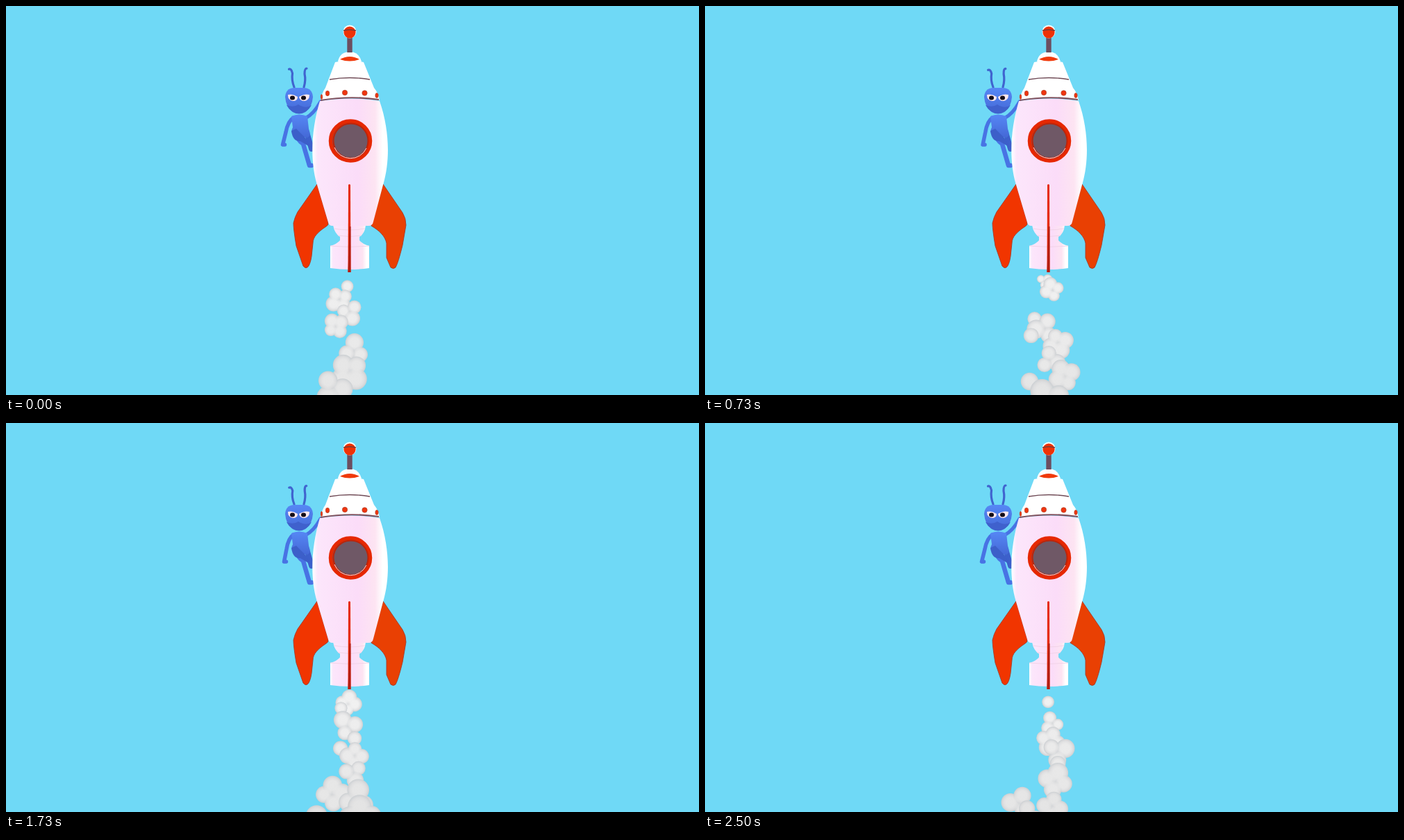
These frames come from a looping animation (998x561 px, 2.53 s). An HTML page with a canvas:

```html
<!DOCTYPE html>
<html lang="en">
<head>
<meta charset="utf-8">
<title>Rocket ride</title>
<style>
  html, body { margin: 0; width: 100%; height: 100%; overflow: hidden; background: #6fd9f6; }
  canvas, svg { position: absolute; left: 0; top: 0; width: 998px; height: 561px; }
</style>
</head>
<body>
<canvas id="smoke" width="998" height="561"></canvas>
<svg viewBox="0 0 998 561">
  <defs>
    <linearGradient id="hull">
      <stop offset="0" stop-color="#fff"/>
      <stop offset=".07" stop-color="#fce6fb"/>
      <stop offset=".6" stop-color="#fbdcf8"/>
      <stop offset=".83" stop-color="#fde4f2"/>
      <stop offset=".93" stop-color="#fff"/>
    </linearGradient>
    <linearGradient id="skin" x2="0" y2="1">
      <stop offset="0" stop-color="#5688f5"/>
      <stop offset="1" stop-color="#4468d6"/>
    </linearGradient>
  </defs>

  <g fill="none" stroke="#4873e4" stroke-linecap="round">
    <path id="feelerL" stroke="#4064cf" stroke-width="3.2"/>
    <path id="feelerR" stroke="#4064cf" stroke-width="3.2"/>
    <path d="M433 182L440 206" stroke="#3c60cb" stroke-width="8"/>
    <path d="M417 182Q420 194 428 199L437 230H440" stroke-width="6.5" stroke-linejoin="round"/>
    <path id="arm" stroke-width="5.5" stroke-linejoin="round"/>
    <path d="M431 162Q443 156 453 138" stroke-width="5"/>
    <g stroke="none">
      <path d="M411 159Q422 154 434 159L436 177Q440 188 434 190L414 186Q409 182 413 175Z" fill="url(#skin)"/>
      <path d="M411 180L418 177L431 190L439 204L424 195Q413 196 411 180Z" fill="#3c5fc9"/>
      <path d="M402 131Q403 119 414 118H430Q441 119 442 131Q441 146 431 153Q422 158 413 153Q403 146 402 131Z" fill="url(#skin)"/>
      <path d="M404 143Q414 147 421 142Q432 149 440 143Q434 154 422 155Q410 154 404 143Z" fill="#3f61cd"/>
      <path d="M406 128Q413 126 420 131Q420 137 413 137Q406 136 406 128ZM437 128Q430 126 422 131Q423 137 430 137Q437 136 437 128Z" fill="#ffe9ee"/>
    </g>
    <path d="M412 132.5H413M428 132.5H429" stroke="#140d18" stroke-width="6"/>
  </g>

  <g stroke="#a73a24" stroke-width=".9">
    <path d="M448 257L464 312Q465 316 461 318C449 326 442 333 442 342L440 361Q438 374 434 377Q431 379 428 375L418 346Q414 322 414 313Q416 304 420 297Z" fill="#f13500"/>
    <path d="M543 257L571 298Q576 306 576 316L571 345Q565 370 561 377Q558 380 554 377L548 363V342C546 332 538 324 526 317Z" fill="#e94003"/>
  </g>

  <g fill="url(#hull)">
    <path d="M471 316H518Q517 328 509 333V338Q513 343 523 346V378Q495 382 467 378V346Q477 343 481 338V333Q473 328 471 316Z"/>
    <path d="M472 321Q495 325 517 321M478 331Q495 334 512 331M467 346Q495 349 523 346" fill="none" stroke="#f2d3e8"/>
    <path d="M452 137Q495 130 538 137C553 180 553 225 543 258L529 311Q528 317 522 317H470Q465 317 464 312L448 258C438 225 439 180 452 137Z"/>
  </g>
  <g fill="#fff">
    <path d="M474 81Q494 76 515 81L530 118Q536 125 538 136Q495 129 453 136Q455 125 460 118Z"/>
    <path d="M478 80Q481 66 495 66Q508 66 512 80Z"/>
  </g>
  <path d="M481 77Q495 69 509 77Q495 82 481 77Z" fill="#f03a0c"/>
  <path d="M466 106Q495 101 524 106" fill="none" stroke="#6f4a55" stroke-width="1.3"/>
  <path d="M453 136Q495 129 537 135" fill="none" stroke="#82515d" stroke-width="2.2"/>
  <g fill="#ee3510" stroke="#a8452f" stroke-width=".6">
    <ellipse cx="463" cy="126" rx="2.8" ry="3.7"/>
    <ellipse cx="488" cy="125" rx="3.7" ry="3.7"/>
    <ellipse cx="516.5" cy="125.5" rx="3.7" ry="3.7"/>
    <ellipse cx="534" cy="129" rx="2.2" ry="3.5"/>
    <ellipse cx="454.5" cy="131" rx="1.3" ry="3.5"/>
  </g>

  <path d="M495 43V67" stroke="#6c4e60" stroke-width="7.4"/>
  <circle cx="495" cy="37" r="9.5" fill="#fff"/>
  <circle cx="495" cy="38" r="8.6" fill="#ee3206"/>
  <path d="M486 35.5Q495 33 504 35.5" fill="none" stroke="#7a3a36" stroke-width="1.4"/>

  <circle cx="496" cy="194.5" r="28.5" fill="#6f5866" stroke="#e62800" stroke-width="5.5"/>
  <circle cx="496.5" cy="194.5" r="25" fill="none" stroke="#bd2409" stroke-width="2"/>
  <path d="M473 204A25 25 0 0 0 519 205" fill="none" stroke="#f6d9dc"/>
  <path d="M493 258Q494.5 256 496 258L496.5 384H492.5Z" fill="#e62c0a"/>
  <path d="M494.5 318H496.5V384H492.5Z" fill="#b51d12"/>
</svg>
<script>
const LOOP = 2530, FALL = 0.25;
const ctx = document.getElementById('smoke').getContext('2d');

// Birth time in ms and sideways drift of each puff.
const CLOUDS = [
  [-608, -14], [-510, 3], [-384, 9], [-245, -18], [-165, 6], [-95, -17],
  [70, 3], [198, 20], [288, 5], [386, 17], [470, -3],
  [694, 16], [745, -5], [898, -6], [1010, -23], [1058, 13], [1162, 10], [1190, -15],
  [1310, 8], [1410, 11], [1585, 1], [1714, 4], [1830, -17], [1885, 6], [1912, -28],
  [2035, 11], [2204, 18], [2268, 7], [2368, 12]
];
const BALLS = [
  [-16, 1], [165, -17], [430, -22], [526, -20], [830, 11], [1454, -10],
  [1512, 13], [1686, -15], [2136, 16], [2492, 6]
];
const puffs = [
  ...CLOUDS.map(([birth, drift], i) =>
    ({ birth, drift, seed: i, lobes: 3 + i % 2, size: 21 + 2.5 * Math.cos(birth / 85) })),
  ...BALLS.map(([birth, drift]) => ({ birth, drift, seed: 0, lobes: 1, size: 11 }))
].sort((a, b) => b.birth - a.birth);

function disc([x, y, r], stops) {
  const g = ctx.createRadialGradient(x, y, 0, x, y, r);
  stops.forEach(([at, color]) => g.addColorStop(at, color));
  ctx.fillStyle = g;
  ctx.beginPath();
  ctx.arc(x, y, r, 0, 7);
  ctx.fill();
}

function drawPuff({ birth, drift, seed, lobes, size }, t) {
  const age = t - birth;
  if (age < -50 || age > 820) return;
  const y = 400 + age * FALL, p = (y - 400) / 160;
  const x = 491 + drift * (0.5 + p);
  const R = size * (0.8 + 0.4 * p) * Math.min(1, (age + 50) / 50);
  const spots = Array.from({ length: lobes }, (_, i) => {
    if (lobes === 1) return [x, y, R];
    const a = seed * 2.4 + i * 2 * Math.PI / lobes;
    return [x + R * 0.52 * Math.cos(a), y + R * 0.52 * Math.sin(a),
            R * (0.56 + 0.06 * Math.sin(seed + i * 2))];
  });
  // Shared rim first, then the bright cores so that lobes melt together.
  const tone = Math.round(241 - Math.max(0, p) * 12);
  const core = alpha => `rgba(${tone},${tone},${tone},${alpha})`;
  for (const s of spots) disc(s, [[0, '#dedede'], [0.75, '#d8d8da'], [1, '#cbcfd2']]);
  for (const s of spots) disc(s, [[0, core(1)], [0.5, core(0.95)], [1, core(0)]]);
}

function drawAnt(t) {
  const sway = ((1 - Math.cos(2 * Math.PI * t / LOOP)) / 2) ** 2;
  const k = sway * sway, hand = 399.5 + 4 * sway;
  const set = (id, d) => document.getElementById(id).setAttribute('d', d);
  set('arm', `M414 161Q${406 + sway} 166 ${403 + 2 * sway} 182L${hand - 1} 200H${hand + 2}`);
  set('feelerL', `M415 117Q411 107 ${412.5 + k} ${97 + 3 * k}Q${411 + k} ${90 + 7 * k} ${407.5 + k} ${91 + 9 * k}`);
  set('feelerR', `M429 117Q432 107 ${430 + k} ${98 + k}Q${430 - k} ${90 + 2 * k} ${433 - k} ${90 + 3 * k}`);
}

function frame(now) {
  const t = now % LOOP;
  ctx.clearRect(0, 0, 998, 561);
  puffs.forEach(puff => drawPuff(puff, t));
  drawAnt(t);
  requestAnimationFrame(frame);
}
requestAnimationFrame(frame);
</script>
</body>
</html>
```
